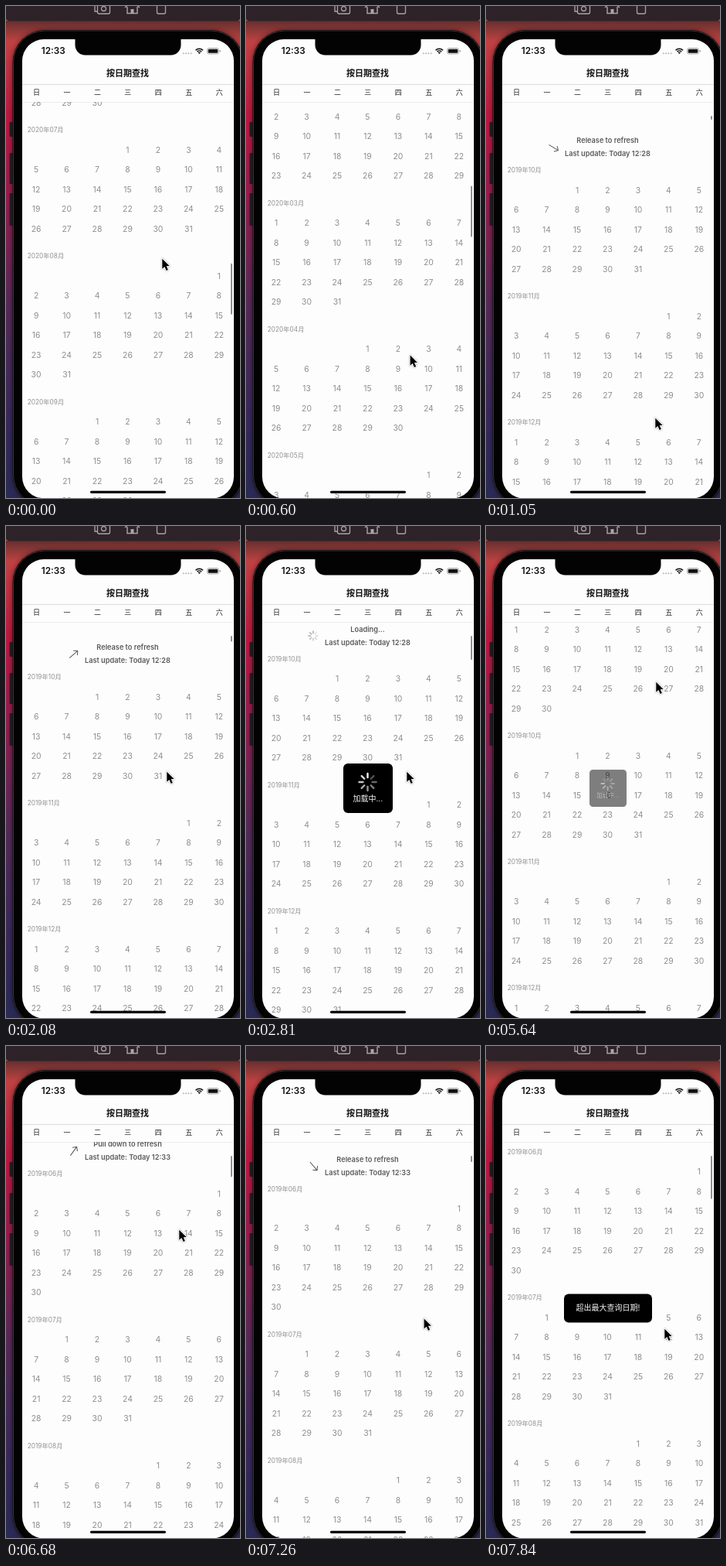
These frames come from a looping animation (303 by 636 pixels, 7.99 s). An HTML page with a canvas:

```html
<!DOCTYPE html>
<html lang="zh-CN">
<head>
<meta charset="utf-8">
<title>Calendar pull to refresh</title>
<style>
html, body { margin: 0; width: 100%; height: 100%; overflow: hidden; background: #2b2a55; }
canvas { display: block; width: 303px; height: 636px; }
</style>
</head>
<body>
<canvas id="stage"></canvas>
<script>
const W = 303, H = 636, LOOP = 7990, STEPS = 54;
const FONT = '"Inter", "Noto Sans CJK SC", "Noto Sans CJK", sans-serif';
const ROW = 25.5, TOP = 137.5, CLIP_TOP = 124, THRESHOLD = 35.7;
const SCREEN = [21, 43, 274, 593.5, 28];

const RELEASE = 15, RELOAD = 38, TURN = 1.8;
const firstScroll = [[1, 1469], [7, -75.5], [11, 0], [14, -58.5], [18, -35]];
const secondScroll = [[40, 543], [43, -57], [47, 0], [50, -64.5], [53, 0]];
const cursorPath = [[0, 202, 326], [7, 219, 532], [11, 208, 200], [14, 208, 317], [29, 208, 317],
  [34, 220, 201], [40, 220, 201], [43, 226, 340], [45, 224, 237], [50, 231, 365]];

const colX = c => 39.5 + c * 39.45;
const ramp = (t, from, to) => Math.min(1, Math.max(0, (t - from) / (to - from)));
const smooth = p => p * p * (3 - 2 * p);

// Sum of eased moves from each key point to the next
function follow(path, t, i = 1) {
  return path.reduce((value, key, n) => n === 0 ? key[i]
    : value + (key[i] - path[n - 1][i]) * smooth(ramp(t, path[n - 1][0], key[0])), 0);
}

const scrollAt = t => follow(t < RELOAD ? firstScroll : secondScroll, t);

// The arrow turns at a steady rate toward the state of the last moments
function arrowTurn(t) {
  const n = 40;
  let armed = 0;
  for (let i = 0; i < n; i++) if (-scrollAt(t - TURN * i / n) > THRESHOLD) armed++;
  return Math.PI * armed / n;
}

const canvas = document.getElementById('stage');
const ctx = canvas.getContext('2d');
const dpr = window.devicePixelRatio || 1;
canvas.width = W * dpr;
canvas.height = H * dpr;

// June 2019 to July 2021; the first four months arrive with the refresh
const months = Array.from({ length: 26 }, (_, i) => {
  const start = new Date(Date.UTC(2019, 5 + i, 1));
  const year = start.getUTCFullYear(), month = start.getUTCMonth();
  const first = start.getUTCDay();
  const days = new Date(Date.UTC(year, month + 1, 0)).getUTCDate();
  const label = `${year}年${String(month + 1).padStart(2, '0')}月`;
  return { first, days, label, height: 10 + ROW * (Math.ceil((first + days) / 7) + 1) };
});

function text(str, x, y, size, color, weight = 400, align = 'center') {
  ctx.font = `${weight} ${size}px ${FONT}`;
  ctx.textAlign = align;
  ctx.textBaseline = 'middle';
  ctx.fillStyle = color;
  ctx.fillText(str, x, y);
}

function box(x, y, w, h, r, fill, stroke, width = 1) {
  ctx.beginPath();
  ctx.roundRect(x, y, w, h, r);
  if (fill) { ctx.fillStyle = fill; ctx.fill(); }
  if (stroke) { ctx.strokeStyle = stroke; ctx.lineWidth = width; ctx.stroke(); }
}

function line(points, color, width) {
  ctx.beginPath();
  points.forEach(([x, y]) => ctx.lineTo(x, y));
  ctx.strokeStyle = color;
  ctx.lineWidth = width;
  ctx.stroke();
}

function at(x, y, draw, { scale = 1, angle = 0, alpha = 1 } = {}) {
  ctx.save();
  ctx.translate(x, y);
  ctx.rotate(angle);
  ctx.scale(scale, scale);
  ctx.globalAlpha *= alpha;
  draw();
  ctx.restore();
}

function verticalFade(from, to, ...colors) {
  const g = ctx.createLinearGradient(0, from, 0, to);
  colors.forEach((c, i) => g.addColorStop(i / (colors.length - 1), c));
  return g;
}

function drawDesktop() {
  ctx.fillStyle = verticalFade(20, H, '#c04c43', '#bd1840', '#8a1f50', '#562a58', '#3d295b', '#292a55');
  ctx.fillRect(0, 0, W, H);
  ctx.fillStyle = verticalFade(19, 46, 'rgba(40,26,32,.6)', 'rgba(40,26,32,0)');
  ctx.fillRect(0, 19, W, 27);
  box(-1, -10, W + 2, 29.5, 6, '#2d2329');

  const grey = '#aaa4a8';
  box(118.5, -4, 16, 14, 2, null, grey, 1.3);
  line([[115, 0], [115, 7], [118, 7]], grey, 1.3);
  ctx.beginPath();
  ctx.arc(126.5, 3.5, 3, 0, 7);
  ctx.stroke();
  line([[154, 2], [163.5, -6], [173, 2]], grey, 1.4);
  line([[157, 1], [157, 9.5], [170, 9.5], [170, 1]], grey, 1.4);
  box(161.5, 4, 4, 5.5, 0, grey);
  box(195.5, -8, 11, 18, 2, null, grey, 1.3);
}

function drawPhone() {
  [[150, 19], [190, 40], [242, 42]].forEach(([y, h]) => box(4.5, y, 5, h, 1.5, '#272024'));
  ctx.save();
  ctx.shadowColor = 'rgba(0,0,0,.45)';
  ctx.shadowBlur = 7 * dpr;
  box(8.5, 31, 299, 617, 42, '#000');
  ctx.restore();
  box(9.5, 32, 297, 615, 41, '#030303', '#3c3739', 1);
  box(...SCREEN, '#fdfdfd');
}

function drawSpinner(radius, rgb, phase) {
  ctx.lineCap = 'round';
  for (let i = 0; i < 8; i++) {
    const a = i * Math.PI / 4, age = (phase - i + 8) % 8;
    const c = Math.cos(a), s = Math.sin(a);
    line([[c * radius * 0.5, s * radius * 0.5], [c * radius * 0.92, s * radius * 0.92]],
      `rgba(${rgb},${0.95 - age * 0.09})`, radius * 0.2);
  }
}

function drawRefreshHeader(y, t, pull, phase) {
  const loading = t >= RELEASE && t < RELOAD;
  const label = loading ? 'Loading...' : pull > THRESHOLD ? 'Release to refresh' : 'Pull down to refresh';
  text(label, 157.5, y - 38.5, 9.2, '#5a5a5a', 600);
  text(`Last update: Today ${t < RELOAD ? '12:28' : '12:33'}`, 157.5, y - 21.3, 9.2, '#5a5a5a', 600);
  if (loading) {
    at(87, y - 30.5, () => drawSpinner(6.5, '150,150,150', phase));
  } else {
    at(87.5, y - 30, () => {
      line([[0, -7], [0, 7]], '#555', 1);
      line([[-4, 3], [0, 7], [4, 3]], '#555', 1);
    }, { angle: -arrowTurn(t) });
  }
}

function drawCalendar(t, phase) {
  const scroll = scrollAt(t);
  const shown = t < RELOAD ? months.slice(4) : months;
  ctx.save();
  ctx.beginPath();
  ctx.rect(21, CLIP_TOP, 274, H - CLIP_TOP);
  ctx.clip();
  let y = TOP - scroll;
  if (scroll < 0) drawRefreshHeader(y, t, -scroll, phase);
  for (const m of shown) {
    if (y + m.height > 100 && y < H + 20) {
      text(m.label, 27.7, y, 8.3, '#919191', 400, 'left');
      for (let d = 0; d < m.days; d++) {
        const cell = m.first + d;
        text(d + 1, colX(cell % 7) - 0.4, y + ROW * (1 + Math.floor(cell / 7)), 10.4, '#8e8e8e');
      }
    }
    y += m.height;
  }
  const ratio = 479 / shown.reduce((sum, m) => sum + m.height, 0);
  const thumb = Math.max(5, 508 * ratio + Math.min(0, scroll));
  ctx.globalAlpha = 1 - ramp(t, 19, 21) + ramp(t, 40, 41);
  box(291, 142 + Math.max(0, scroll) * ratio, 2, thumb, 1, '#8f8f8f');
  ctx.restore();
}

function drawChrome() {
  box(89.5, 36, 137, 27.5, [0, 0, 13, 13], '#030303');
  text('12:33', 61.3, 58.7, 11.8, '#111', 600);
  for (let i = 0; i < 4; i++) box(228.7 + i * 3.3, 60.2, 2, 2, 1, '#b5b5b5');
  ctx.lineCap = 'butt';
  [1.2, 4, 6.8].forEach(r => {
    ctx.beginPath();
    ctx.arc(250.3, 62, r, -Math.PI * 0.75, -Math.PI * 0.25);
    ctx.strokeStyle = '#111';
    ctx.lineWidth = r < 2 ? 2.4 : 1.6;
    ctx.stroke();
  });
  box(260.5, 54.5, 15, 7.5, 2.2, null, '#999', 0.8);
  box(261.7, 55.7, 12.6, 5.1, 1.2, '#111');
  box(276.7, 57, 1.2, 2.6, 0.6, '#999');

  text('按日期查找', 157.5, 87.5, 11, '#111', 700);
  box(21, 101, 274, 1, 0, '#dcdcdc');
  [...'日一二三四五六'].forEach((day, c) => text(day, colX(c), 112.5, 9, '#222', 500));
  box(21, 124, 274, 1, 0, '#ededed');
}

function drawPanel(alpha, w, h, content) {
  if (alpha <= 0) return;
  at(158, 339, () => {
    box(-w / 2, -h / 2, w, h, 6, '#000');
    content();
  }, { scale: 0.5 + alpha / 2, alpha });
}

function drawCursor(x, y) {
  at(x + 0.3, y + 0.7, () => {
    ctx.beginPath();
    [[0, 0], [0, 14.5], [3.4, 11.4], [5.9, 17], [8.4, 15.9], [6, 10.5], [10.4, 10.3]]
      .forEach(([px, py]) => ctx.lineTo(px, py));
    ctx.closePath();
    ctx.lineJoin = 'round';
    ctx.shadowColor = 'rgba(0,0,0,.4)';
    ctx.shadowBlur = 2 * dpr;
    ctx.strokeStyle = '#fff';
    ctx.lineWidth = 2.2;
    ctx.stroke();
    ctx.shadowColor = 'transparent';
    ctx.fillStyle = '#000';
    ctx.fill();
  }, { scale: 0.9 });
}

function render(now) {
  const t = Math.min(STEPS - 1, Math.floor(now % LOOP / LOOP * STEPS + 0.05));
  const phase = Math.floor(t * 1.18) % 8;

  ctx.setTransform(dpr, 0, 0, dpr, 0, 0);
  drawDesktop();
  drawPhone();
  ctx.save();
  ctx.beginPath();
  ctx.roundRect(...SCREEN);
  ctx.clip();
  drawChrome();
  drawCalendar(t, phase);
  box(109, 626.7, 98, 3.2, 1.6, '#000');
  drawPanel(ramp(t, 15, 17) - ramp(t, 37, 39), 64, 64, () => {
    at(-0.5, -8, () => drawSpinner(12, '255,255,255', phase));
    text('加载中...', -0.3, 13.5, 10, '#f4f4f4');
  });
  drawPanel(ramp(t, 50, 52), 114, 37, () => text('超出最大查询日期!', 0, 0.3, 10, '#f4f4f4'));
  ctx.restore();
  drawCursor(follow(cursorPath, t, 1), follow(cursorPath, t, 2));
}

const started = performance.now();
function loop() {
  render(performance.now() - started);
  requestAnimationFrame(loop);
}
loop();
</script>
</body>
</html>
```
